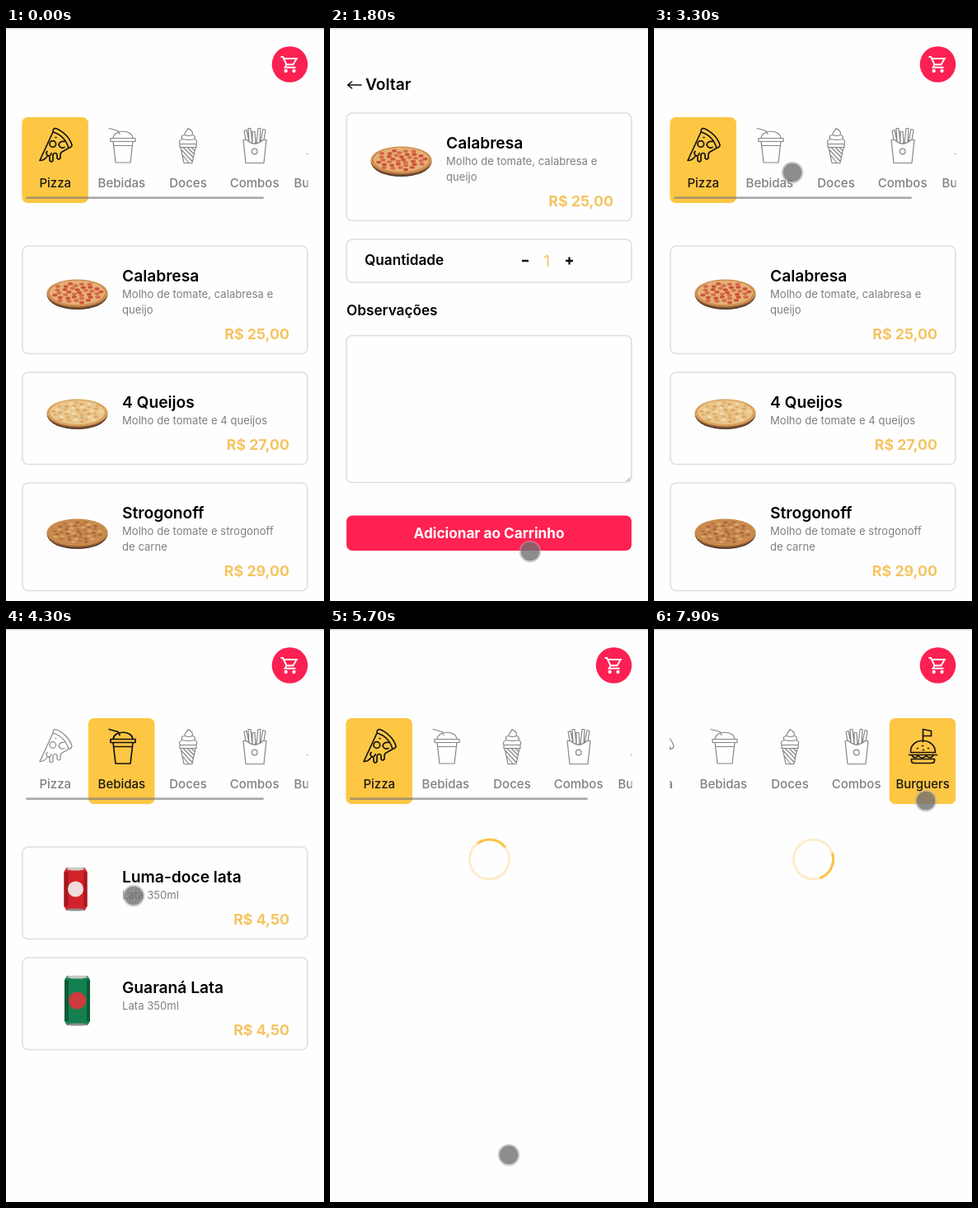
Write an HTML page that moves like this. It is 386x694 px and loops after 8000 ms.

```html
<!DOCTYPE html>
<html lang="pt-BR">
<head>
<meta charset="utf-8">
<title>Cardápio</title>
<style>
  html, body { margin: 0; width: 100%; height: 100%; overflow: hidden; background: #fefefe; }
  svg { display: block; width: 386px; height: 694px; font-family: Inter, "Open Sans", sans-serif; }
  .title { font-size: 19.2px; font-weight: 600; }
  .desc { font-size: 13px; letter-spacing: .06px; fill: #7e7e7e; }
  .price { font-size: 17.8px; font-weight: 700; fill: #f5c463; text-anchor: end; }
  .label { font-size: 15px; font-weight: 500; fill: #808080; text-anchor: middle; }
  .field { font-size: 17.2px; font-weight: 600; }
  .count { font-size: 19px; fill: #f5c463; text-anchor: middle; }
  .button { font-size: 17.2px; font-weight: 700; fill: #fff; text-anchor: middle; }
  .card { fill: #fefefe; stroke: #dedede; stroke-width: 1.6; }
  .icon { fill: none; stroke: #858585; stroke-width: 1.2; stroke-linejoin: round; stroke-linecap: round; }
  .tab rect { fill: none; }
  .tab.on rect { fill: #fdc744; }
  .tab.on .icon { stroke: #161210; stroke-width: 1.7; }
  .tab.on .label { fill: #1d1813; }
  .line { fill: none; stroke: #111; stroke-width: 1.6; stroke-linecap: round; stroke-linejoin: round; }
  .sign { stroke-width: 2.3; stroke-linecap: butt; }
</style>
</head>
<body>
<svg id="stage" viewBox="0 0 386 694"></svg>
<script>
const LOOP = 8000;
const stage = document.getElementById('stage');
const $ = id => document.getElementById(id);

const text = (x, y, cls, str) => `<text x="${x}" y="${y}" class="${cls}">${str}</text>`;
const card = (y, h) => `<rect class="card" x="20" y="${y}" width="346" height="${h}" rx="7"/>`;
const ellipse = (x, y, rx, ry, fill) =>
  `<ellipse cx="${x.toFixed(1)}" cy="${y.toFixed(1)}" rx="${rx}" ry="${ry}" fill="${fill}"/>`;

function random(seed) {
  return () => (seed = seed * 16807 % 2147483647) / 2147483647;
}

function pizza(y, seed, crust, cheese, spots, rx, ry, count) {
  const rnd = random(seed);
  let out = ellipse(86.5, y + 2.5, 36, 16.5, '#4d3526') + ellipse(86.5, y + 1, 37, 16.5, '#8d5a34') +
    ellipse(86.5, y - 1, 37, 16.5, crust) + ellipse(86.5, y - 1.5, 33.5, 14.5, cheese);
  for (let i = 0; i < count; i++) {
    const a = i * 2.4, r = Math.sqrt((i + .5) / count) * .92;
    out += ellipse(86.5 + Math.cos(a) * r * 33 + rnd() * 2 - 1, y - 1.5 + Math.sin(a) * r * 14,
      rx, ry, spots[i % spots.length]);
  }
  return out;
}

function can(x, y, w, h, fill, dark, badge) {
  const l = x - w / 2, t = y - h / 2;
  return `<path d="M${l + 3} ${t}h${w - 6}l3 5v${h - 10}l-3 5h${6 - w}l-3-5v${10 - h}z" fill="${fill}"/>
    <rect x="${l}" y="${t + 5}" width="5" height="${h - 10}" fill="${dark}"/>
    <rect x="${l + w - 4}" y="${t + 5}" width="4" height="${h - 10}" fill="${dark}"/>
    ${ellipse(x, t + 1.5, w / 2 - 3, 2, '#c9c9c7')}${ellipse(x, t + h - 1, w / 2 - 3, 1.6, '#8d8d8b')}
    ${ellipse(x, y, w * .34, w * .34, badge)}`;
}

const menu = {
  pizza: [
    { name: 'Calabresa', desc: ['Molho de tomate, calabresa e', 'queijo'], price: '25,00',
      art: y => pizza(y + 58, 7, '#cf8f52', '#e6b077', ['#cb5238', '#d8694a'], 3.1, 1.8, 36) },
    { name: '4 Queijos', desc: ['Molho de tomate e 4 queijos'], price: '27,00',
      art: y => pizza(y + 50, 19, '#d8a25c', '#e9c68c', ['#deb06c', '#f3dcae', '#d9a561'], 2.6, 1.4, 40) },
    { name: 'Strogonoff', desc: ['Molho de tomate e strogonoff', 'de carne'], price: '29,00',
      art: y => pizza(y + 61, 31, '#c98a4b', '#c98a50', ['#a9683a', '#dba768', '#b5743f'], 2.6, 1.4, 46) }
  ],
  drinks: [
    { name: 'Luma-doce lata', desc: ['Lata 350ml'], price: '4,50',
      art: y => can(84.5, y + 51, 28, 52, '#d3222b', '#a5161f', '#f0dcdc') },
    { name: 'Guaraná Lata', desc: ['Lata 350ml'], price: '4,50',
      art: y => can(86.5, y + 52, 31, 60, '#15804f', '#0d5a38', '#cf3a3d') }
  ]
};

const heightOf = item => 94 + 19 * item.desc.length;

function product(item, y) {
  const h = heightOf(item);
  return card(y, h - 1.5) + item.art(y) + text(141, y + 42.5, 'title', item.name) +
    item.desc.map((d, i) => text(141, y + 63 + 19 * i, 'desc', d)).join('') +
    text(344, y + h - 19.5, 'price', 'R$ ' + item.price);
}

function list(id) {
  let y = 264;
  return `<g id="list-${id}">` + menu[id].map(item => {
    const out = product(item, y);
    y += heightOf(item) + 21;
    return out;
  }).join('') + '</g>';
}

function detail(id) {
  const item = menu[id][0], dy = heightOf(item) - 132;
  return `<g id="detail-${id}">
    <path class="line" d="M22 69H38M26.5 65L21.5 69L26.5 73"/>
    ${text(43, 75, 'title', 'Voltar')}${product(item, 103)}
    <g transform="translate(0 ${dy})">
      ${card(256, 52)}${text(42, 286.5, 'field', 'Quantidade')}
      <path class="line sign" d="M233 282h8M286 282h9M290.5 277.5v9"/>
      ${text(263, 288.5, 'count', '1')}
      ${text(20, 348, 'field', 'Observações')}${card(372.5, 178)}
      <path d="M360 549l4.5-4.5M363 549l1.5-1.5" stroke="#777" stroke-width=".8"/>
      <rect x="20" y="590.5" width="346" height="42.5" rx="7" fill="#ff2152"/>
      ${text(193, 617.5, 'button', 'Adicionar ao Carrinho')}
    </g></g>`;
}

const tabs = [
  ['pizza', 'Pizza', 40, `M20 1C29 4 37 12 40 21Q40 24 36 25C33 15 26 8 17 5.500Q17 1 20 1ZM17 5.500L1 40Q6 40 9 36
    Q12 33 13 36V40q2 3 4 0V34q0-3 3-3q2 0 2 3v3q2 3 4 0v-4Q26 30 29 29L36 25
    M13 20a3.800 3.800 0 1 0 7.600 0a3.800 3.800 0 1 0-7.600 0M31 17Q25 16 24 21Q26 26 31 24
    M10 29a3 3 0 1 0 5 2M20 12h1`],
  ['drinks', 'Bebidas', 124, `M1 1L12 4L14 8M6 13C7 2 29 2 30 13M3 13H33V17H3ZM6 17L9 42.500H27L30 17M7 22H29`],
  ['sweets', 'Doces', 210, `M11 1C14 3 18 5 16 9C19 9 20 12 19 14C22 15 22 18 21 20H1C0 18 0 15 4 14C2 11 4 9 7 9
    C6 5 10 5 11 1ZM7 9Q12 11 16 9M4 14Q12 16 19 14M1 20V24H21V20M2 24L6 43H16L20 24M3 27L16 41
    M5 24L17 36M10 24L18 32M15 24L19 28M4 33L12 43`],
  ['combos', 'Combos', 286, `M2 15L5 43H27L30 15H26Q16 24 6 15ZM12.500 29a3.300 3.300 0 1 0 6.600 0a3.300 3.300 0 1 0-6.600 0
    M5 15L3 4L6 3L9 17M9 17L8 1H11L13 19M13 19L13 5H16L17 20M18 19L20 1H23L22 18M23 17L26 2L29 3L27 15`],
  ['burgers', 'Burguers', 364.5, `M18 16V1L28 3V9H18M3 29C2 10 33 10 33 29ZM1 32H35M4 32q4 6 8 1q5 5 10 0q5 5 9-1
    M4 37H32V39Q32 42 28 42H8Q4 42 4 39ZM11 24h1M17 21h1M24 24h1M18 26h1`]
];

const tab = ([id, label, x, d], i) => {
  const left = 19.3 + 80.6 * i;
  return `<g class="tab" id="tab-${id}"><rect x="${left}" y="108" width="80.6" height="104" rx="7"/>
    <path class="icon" transform="translate(${x} 120.5)" d="${d}"/>
    ${text(left + 40.5, 193, 'label', label)}</g>`;
};

stage.innerHTML = `
  <clipPath id="strip"><rect x="19" y="100" width="347.5" height="120"/></clipPath>
  <rect width="386" height="694" fill="#fefefe"/>
  <rect width="386" height="1.6" fill="#dcdcdc"/>
  <g id="home">
    <circle cx="344.5" cy="44" r="21.8" fill="#fc2152"/>
    <g transform="translate(332.5 32)" fill="none" stroke="#fff" stroke-width="1.9">
      <path d="M1 3H3.6L8 12.2H16L20.3 5H4.8M8 12.2L6.2 15.8H19"/>
      <circle cx="7.2" cy="20" r="1.2"/><circle cx="17" cy="20" r="1.2"/>
    </g>
    <g clip-path="url(#strip)"><g id="tabs">${tabs.map(tab).join('')}</g></g>
    <rect id="thumb" x="24" y="204.2" width="289" height="2.8" rx="1.4" fill="#777" fill-opacity=".6"/>
    ${list('pizza')}${list('drinks')}
    <g id="spinner" fill="none" stroke-width="3">
      <circle r="24" stroke="#fdeccb"/>
      <path d="M-17 -17A24 24 0 0 1 17 -17" stroke="#f9c445"/>
    </g>
  </g>
  ${detail('pizza')}${detail('drinks')}
  <g id="touch">
    <circle r="13.3" fill="#aaa" fill-opacity=".55"/>
    <circle r="11.3" fill="#555" fill-opacity=".55"/>
  </g>`;

// start time, page, category, list loaded
const scenes = [
  [0, 'home', 'pizza', true],
  [800, 'detail', 'pizza'],
  [2100, 'home', 'pizza', false],
  [2600, 'home', 'pizza', true],
  [3450, 'home', 'drinks', false],
  [3850, 'home', 'drinks', true],
  [4600, 'detail', 'drinks'],
  [5680, 'home', 'pizza', false],
  [6200, 'home', 'pizza', true],
  [7580, 'home', 'burgers', false]
];

// time, x, y, opacity
const touch = [
  [200, 192, 362, 0], [300, 190, 358, 1], [550, 183, 345, 1], [800, 183, 345, 1], [950, 183, 345, 0],
  [1480, 262, 553, 0], [1580, 258, 575, 1], [1800, 243, 634, 1], [2000, 248, 628, 1],
  [2300, 372, 105, 1], [2800, 372, 105, 1], [3300, 168, 175, 1], [3700, 166, 182, 1],
  [4200, 155, 323, 1], [4500, 155, 323, 1], [4900, 262, 553, 1], [5150, 232, 600, 1],
  [5400, 216, 656, 1], [5700, 217, 637, 1], [6000, 217, 637, 1], [6600, 336, 188, 1],
  [6800, 368, 190, 1], [7200, 312, 190, 1], [7500, 333, 166, 1], [7700, 332, 182, 1], [7900, 330, 208, 1]
];

const ease = (t, a, b) => {
  const k = Math.min(1, Math.max(0, (t - a) / (b - a)));
  return k * k * (3 - 2 * k);
};

function poseAt(t) {
  const i = touch.findIndex(p => p[0] > t);
  if (i === 0) return touch[0];
  if (i < 0) return touch[touch.length - 1];
  const a = touch[i - 1], b = touch[i], k = ease(t, a[0], b[0]);
  return a.map((v, n) => v + (b[n] - v) * k);
}

const show = (id, on) => $(id).setAttribute('display', on ? 'inline' : 'none');

function draw(t) {
  const [start, page, cat, loaded] = scenes.filter(s => s[0] <= t).pop();
  const home = page === 'home';
  show('home', home);
  for (const id in menu) {
    show('list-' + id, loaded && cat === id);
    show('detail-' + id, !home && cat === id);
  }
  for (const [id] of tabs) $('tab-' + id).classList.toggle('on', id === cat);

  show('spinner', home && !loaded);
  $('spinner').setAttribute('transform', `translate(193.5 279) rotate(${(t - start) * .36})`);

  const scroll = ease(t, 6800, 7200);
  $('tabs').setAttribute('transform', `translate(${-56 * scroll} 0)`);
  $('thumb').setAttribute('x', 24 + 49 * scroll);
  $('thumb').setAttribute('opacity', 1 - ease(t, 7350, 7550));

  const [, x, y, o] = poseAt(t);
  $('touch').setAttribute('transform', `translate(${x} ${y})`);
  $('touch').setAttribute('opacity', o);
}

function tick() {
  draw(performance.now() % LOOP);
  requestAnimationFrame(tick);
}
tick();
</script>
</body>
</html>
```
